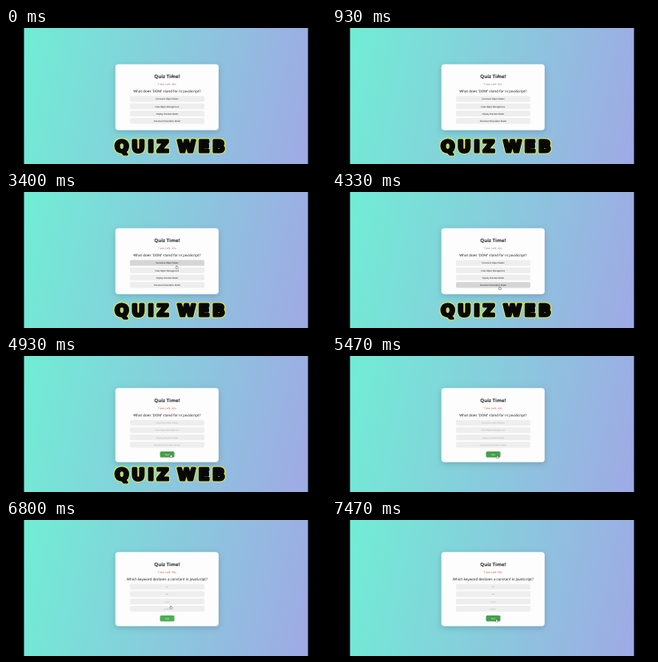
Recreate the animation shown at these times as an HTML page with a canvas. Size 400 px wide and 171 px high, loop 8 s.

```html
<!DOCTYPE html>
<html lang="en">
<head>
<meta charset="utf-8">
<title>Quiz</title>
<style>
  html, body { margin: 0; width: 100%; height: 100%; overflow: hidden; background: #000; }
  canvas { display: block; width: 400px; height: 171px; }
</style>
</head>
<body>
<canvas id="stage"></canvas>
<script>
const W = 400, H = 171, LOOP = 8000;
const canvas = document.getElementById('stage');
const ratio = window.devicePixelRatio || 1;
canvas.width = Math.round(W * ratio);
canvas.height = Math.round(H * ratio);
const ctx = canvas.getContext('2d');
ctx.scale(ratio, ratio);
ctx.textRendering = 'geometricPrecision';

const UI = '"Open Sans", "Noto Sans", sans-serif';
const CENTER = 201.3;
const ROW = { x: 155, y: 85.6, w: 93, h: 7.2, pitch: 9.2 };
const TITLE_END = 5130;

const QUESTIONS = [
  {
    start: 0, answered: 4470,
    text: "What does 'DOM' stand for in JavaScript?",
    options: ['Document Object Model', 'Data Object Management',
              'Display Oriented Model', 'Document Orientation Model']
  },
  {
    start: 5730, answered: 6730,
    text: 'Which keyword declares a constant in JavaScript?',
    options: ['let', 'var', 'const', 'define']
  }
];

// [time, seconds left]
const TICKS = [[0, 46], [870, 45], [1870, 44], [2870, 43], [3870, 42], [5730, 59], [6730, 58]];

// Pointer paths: [time, x, y]
const PATHS = [
  [[0, 208, 60], [1470, 208, 60], [1670, 272, 36]],
  [[2870, 220, -5], [3270, 214, 88], [3670, 211, 107], [4130, 209.5, 119],
   [4470, 209.5, 119], [4870, 206, 123.5], [5330, 206, 123.5], [5470, 206.5, 125],
   [5730, 206.5, 125], [6130, 206, 107], [6730, 206, 107], [7200, 205.5, 124.5],
   [8000, 205.5, 124.5]]
];

const ease = p => p * p * (3 - 2 * p);
const lastStarted = (list, t, time) => list.filter(item => time(item) <= t).pop();

function pointerAt(t) {
  const path = PATHS.find(p => t >= p[0][0] && t <= p[p.length - 1][0]);
  if (!path) return null;
  const i = Math.max(1, path.findIndex(k => k[0] >= t));
  const [t0, x0, y0] = path[i - 1], [t1, x1, y1] = path[i];
  const p = ease((t - t0) / (t1 - t0));
  return { x: x0 + (x1 - x0) * p, y: y0 + (y1 - y0) * p };
}

function box(x, y, w, h, r, color) {
  ctx.fillStyle = color;
  ctx.beginPath();
  ctx.roundRect(x, y, w, h, r);
  ctx.fill();
}

function label(text, y, font, color, x = CENTER) {
  ctx.font = font;
  ctx.fillStyle = color;
  ctx.textAlign = 'center';
  ctx.textBaseline = 'alphabetic';
  ctx.fillText(text, x, y);
}

const inside = (p, x, y, w, h) =>
  p && p.x >= x && p.x <= x + w && p.y >= y && p.y <= y + h;

function drawBackground() {
  ctx.fillStyle = '#000';
  ctx.fillRect(0, 0, W, H);
  const fill = ctx.createLinearGradient(24, 50, 376, 120);
  fill.addColorStop(0, '#72ebd5');
  fill.addColorStop(1, '#9eabe4');
  ctx.fillStyle = fill;
  ctx.fillRect(22.5, 0, 355, H);
}

function drawCard(t, pointer) {
  const question = lastStarted(QUESTIONS, t, q => q.start);
  const answered = t >= question.answered;
  const shift = answered ? -5.2 : 0;

  ctx.save();
  ctx.shadowColor = 'rgba(0, 0, 0, 0.18)';
  ctx.shadowBlur = 7 * ratio;
  ctx.shadowOffsetY = 2 * ratio;
  box(136.7, 45.4 + shift, 129.1, 83 - 2 * shift, 4, '#fdfdfd');
  ctx.restore();

  const seconds = lastStarted(TICKS, t, k => k[0])[1];
  label('Quiz Time!', 62.8 + shift, `700 6.1px ${UI}`, '#222');
  label(`Time Left: ${seconds}s`, 72.4 + shift, `3.55px ${UI}`, answered ? '#d4573a' : '#a07868');
  label(question.text, 81.2 + shift, `4.47px ${UI}`, '#111');

  question.options.forEach((option, i) => {
    const y = ROW.y + i * ROW.pitch + shift;
    const hover = !answered && inside(pointer, ROW.x, y, ROW.w, ROW.h);
    box(ROW.x, y, ROW.w, ROW.h, 1.6, hover ? '#d6d6d6' : '#eee');
    label(option, y + 4.7, '2.6px "Liberation Sans", sans-serif', answered ? '#aaa' : '#111');
  });

  if (answered) {
    const hover = inside(pointer, 192.5, 120, 18, 7.6);
    box(192.5, 120, 18, 7.6, 1.6, hover ? '#45a049' : '#4caf50');
    label('Next', 124.7, '2.6px "Liberation Sans", sans-serif', '#fff', 201.5);
  }
}

function drawTitle() {
  ctx.save();
  ctx.font = '700 20.5px "DejaVu Sans", sans-serif';
  ctx.letterSpacing = '3.6px';
  ctx.wordSpacing = '-3.5px';
  ctx.textAlign = 'left';
  ctx.textBaseline = 'alphabetic';
  ctx.lineJoin = 'round';
  for (const [width, color] of [[5.2, '#e8f24a'], [3.2, '#080808']]) {
    ctx.lineWidth = width;
    ctx.strokeStyle = color;
    ctx.strokeText('QUIZ WEB', 136, 155.8);
  }
  ctx.fillStyle = '#080808';
  ctx.fillText('QUIZ WEB', 136, 155.8);
  ctx.restore();
}

function drawIBeam({ x, y }) {
  ctx.fillStyle = '#555';
  ctx.fillRect(x - 0.25, y - 2, 0.5, 4);
  ctx.fillRect(x - 0.8, y - 2, 1.6, 0.4);
  ctx.fillRect(x - 0.8, y + 1.6, 1.6, 0.4);
}

function drawHand({ x, y }) {
  ctx.save();
  ctx.translate(x, y);
  ctx.beginPath();
  ctx.moveTo(-0.4, 0);
  ctx.lineTo(0.4, 0);
  ctx.lineTo(0.5, 1.3);
  ctx.lineTo(2, 1.7);
  ctx.lineTo(1.7, 3.7);
  ctx.lineTo(-0.5, 3.7);
  ctx.lineTo(-1.5, 2.2);
  ctx.lineTo(-0.5, 2.2);
  ctx.closePath();
  ctx.fillStyle = '#fff';
  ctx.fill();
  ctx.strokeStyle = '#333';
  ctx.lineWidth = 0.4;
  ctx.stroke();
  ctx.restore();
}

function draw(now) {
  const t = now % LOOP;
  const pointer = pointerAt(t);
  drawBackground();
  drawCard(t, pointer);
  if (t < TITLE_END) drawTitle();
  if (pointer) (t < 2000 ? drawIBeam : drawHand)(pointer);
}

const begin = performance.now();
function frame() {
  draw(performance.now() - begin);
  requestAnimationFrame(frame);
}
frame();
</script>
</body>
</html>
```
